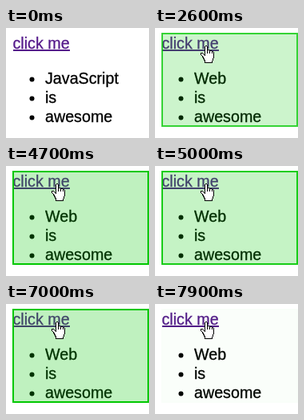
An HTML page for the animation above (8000 ms loop, 179 by 138 pixels).

```html
<!DOCTYPE html>
<html lang="en">
<head>
<meta charset="utf-8">
<title>Click and highlight</title>
<style>
  html, body { margin: 0; width: 100%; height: 100%; overflow: hidden; background: #fff; }
  svg { display: block; width: 100%; height: 100%; }
  text { font: 19.7px "Liberation Sans", Arial, sans-serif; stroke: #000; stroke-width: .3; }
  .link { fill: #551a8b; }
  text.link { stroke: #551a8b; }
</style>
</head>
<body>
<svg viewBox="0 0 179 138">
  <text class="link" x="8.5" y="26">click me</text>
  <rect class="link" x="9" y="27" width="71" height="2"/>
  <g>
    <circle cx="32.5" cy="64.5" r="3"/>
    <circle cx="32.5" cy="88.5" r="3"/>
    <circle cx="32.5" cy="112.5" r="3"/>
    <text id="word" x="49" y="70">JavaScript</text>
    <text x="49" y="94">is</text>
    <text x="49" y="118">awesome</text>
  </g>
  <g id="highlight">
    <rect id="tint" x="10" y="8" width="167" height="114" fill="#00c800"/>
    <rect id="border" x="9" y="7" width="169" height="116" fill="none" stroke="#00c800" stroke-width="2"/>
  </g>
  <path id="hand" fill="#fff" stroke="#000" shape-rendering="crispEdges"
    d="M5.5 12.5V1.5L6.5 .5H7.5L8.5 1.5V9.5V5.5H10.5L11.5 6.5V9.5V6.5H13.5L14.5 7.5V9.5V7.5H15.5L16.5 8.5V15.5L15.5 16.5V18.5L14.5 19.5V21.5H5.5V19.5L2.5 13.5L.5 11.5V9.5H2.5Z"/>
</svg>
<script>
const LOOP = 8000, STEP = 100, FADE = 1000;
const MIN_BORDER = 0.024;
// Each flash holds, fades out and leaves a faint tint behind.
const FLASHES = [
  { start: 2300, hold: 0, residue: 0.018 },
  { start: 4700, hold: 100, residue: 0.006 },
  { start: 7000, hold: 0, residue: 0.018 },
];
const [word, highlight, tint, border, hand] =
  ["word", "highlight", "tint", "border", "hand"].map(id => document.getElementById(id));

const clamp = x => Math.min(1, Math.max(0, x));

function drawHighlight(t) {
  const flash = FLASHES.findLast(f => t >= f.start);
  word.textContent = flash ? "Web" : "JavaScript";
  highlight.style.display = flash ? "" : "none";
  if (!flash) return;
  const progress = clamp((t - flash.start - flash.hold) / FADE);
  const opacity = (1 + Math.cos(Math.PI * progress)) / 2;
  tint.style.opacity = Math.max(0.25 * opacity, flash.residue);
  border.style.opacity = Math.max(opacity, MIN_BORDER);
}

function drawHand(t) {
  const p = clamp((t - 1000) / 800);
  const x = t < 1900 ? Math.round(161 - 103 * p) : 57;
  const y = Math.round(23 - p);
  hand.style.display = t >= 1000 ? "" : "none";
  hand.setAttribute("transform", `translate(${x} ${y})`);
}

function draw(now) {
  const t = Math.floor(now % LOOP / STEP) * STEP;
  drawHighlight(t);
  drawHand(t);
  requestAnimationFrame(draw);
}
requestAnimationFrame(draw);
</script>
</body>
</html>
```
